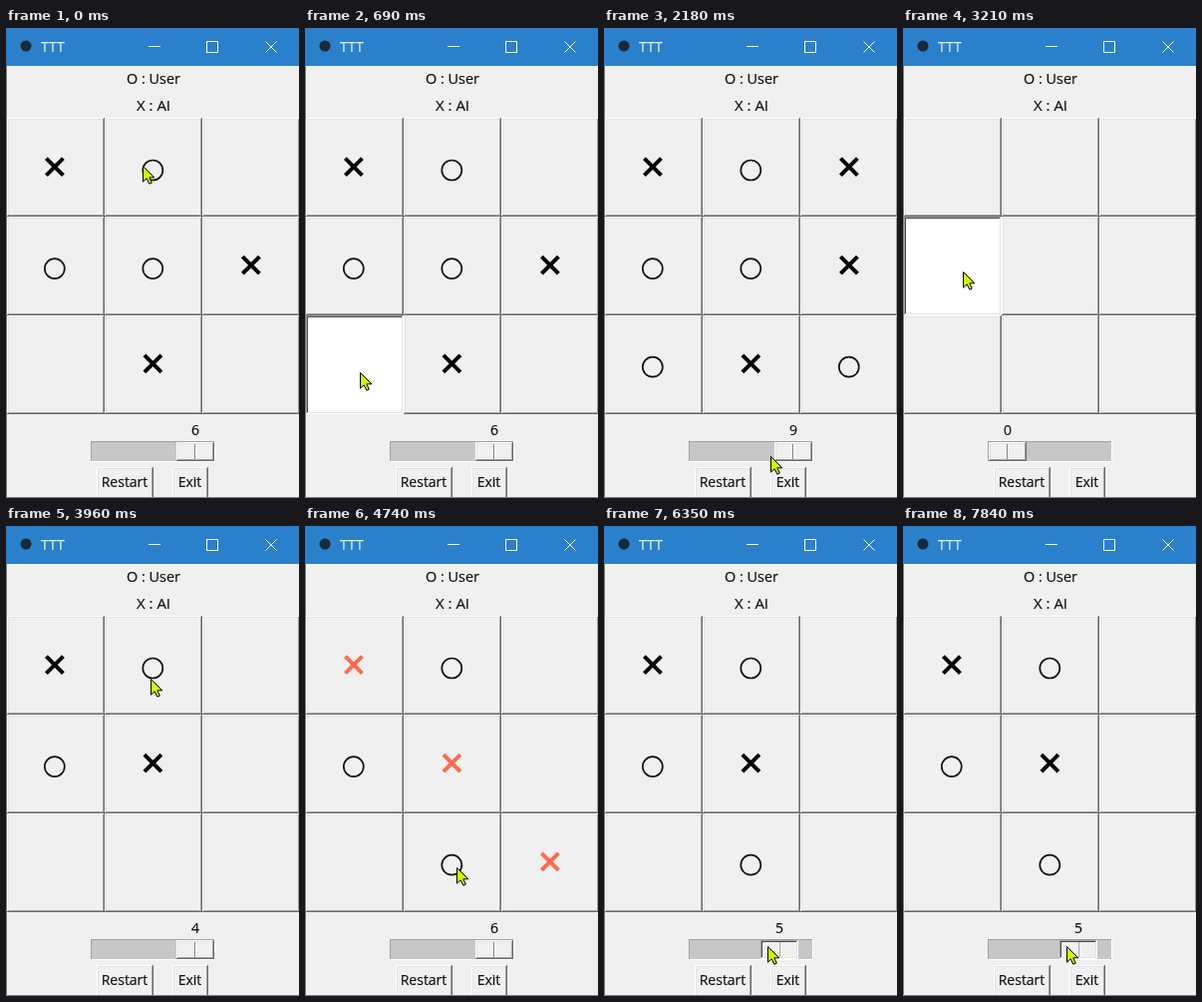
Recreate the animation shown at these times as an HTML page. Size 294x471 px, loop 8 s.

```html
<!DOCTYPE html>
<html lang="en">
<head>
<meta charset="utf-8">
<title>TTT</title>
<style>
  html, body { margin: 0; width: 100%; height: 100%; overflow: hidden; background: #f0f0f0; }
  svg { display: block; width: 294px; height: 471px; }
  text { font: 14px "Open Sans", "Noto Sans", sans-serif; fill: #111; stroke: #111; stroke-width: .2; text-anchor: middle; }
  .caption { fill: #e0f2ff; stroke: #e0f2ff; text-anchor: start; }
  .control { fill: none; stroke: #fff; }
  .o { fill: none; stroke: #111; stroke-width: 1.7; }
  .x { fill: none; stroke: #000; stroke-width: 4; }
  .won .x { stroke: #ff6a4a; }
  .cursor { fill: #c8ff00; stroke: #000; stroke-linejoin: round; }
</style>
</head>
<body>
<svg viewBox="0 0 294 471">
  <rect width="294" height="471" fill="#f0f0f0"/>
  <rect width="294" height="38" fill="#2a80cb"/>
  <circle cx="20" cy="18" r="5.5" fill="#1b2835"/>
  <text class="caption" x="35" y="24">TTT</text>
  <path class="control" d="M143 18.5h12M201.5 13.5h11v11h-11zM260.5 13.5l11 11m0-11l-11 11"/>
  <text x="148" y="56" style="font-size:14.4px">O : User</text>
  <text x="148" y="83" style="font-size:15px">X : AI</text>
  <g id="widgets"></g>
  <path d="M.5 38V470.5H294" fill="none" stroke="#808080"/>
  <path id="cursor" class="cursor" d="M.5.5V16.2L4.2 12.8L6.8 18.2L9.3 17.1L6.8 11.8H11.8Z"/>
</svg>
<script>
const LOOP = 8000, TICK = 135;

// The session is recorded once as pointer glides and widget states.
const glides = [{ start: 0, end: 0, x0: 137, y0: 138, x: 137, y: 138 }];
const states = [{ start: 0, board: "XO.OOX.X.", max: 6, pressed: null }];
let now = 0;

const put = (board, i, mark) => board.slice(0, i) + mark + board.slice(i + 1);
const count = board => board.replaceAll(".", "").length;

function glide(end, x, y) {
  const { x: x0, y: y0 } = glides.at(-1);
  glides.push({ start: now, end, x0, y0, x, y });
  now = end;
}

function set(change) {
  now += TICK;
  states.push({ ...states.at(-1), start: now, ...change });
}

function click(target, board) {
  set({ pressed: target });
  set({ pressed: null, board, max: count(board) });
}

function play(user, ai) {
  let board = put(states.at(-1).board, user, "O");
  if (ai !== undefined) board = put(board, ai, "X");
  click(user, board);
}

glide(540, 55, 345);
play(6, 2);
glide(1350, 205, 346);
glide(1500, 234, 344);
play(8);
glide(2180, 167, 429);
glide(2420, 122, 450);
click("restart", ".........");
glide(3070, 60, 244);
play(3, 0);
glide(3680, 145, 153);
play(1, 4);
glide(4350, 216, 318);
glide(4470, 152, 342);
play(7, 8);
glide(5270, 162, 405);
glide(5670, 178, 423);
set({ pressed: "thumb" });
now = 6080;
set({ board: put(states.at(-1).board, 8, ".") });
now = 5945;
glide(6350, 164, 421);
now = 7190 - TICK;
set({ pressed: null });
now = 7705 - TICK;
set({ pressed: "thumb" });

const at = (list, t) => list.findLast(item => item.start <= t);
const rect = (x, y, w, h, fill) =>
  `<rect x="${x}" y="${y}" width="${w}" height="${h}" fill="${fill}"/>`;

function bevel(x, y, w, h, down, fill = "#f0f0f0") {
  const [a, b, c, d] = down
    ? ["#a0a0a0", "#484848", "#fff", "#e3e3e3"]
    : ["#fff", "#e3e3e3", "#696969", "#a0a0a0"];
  return rect(x, y, w, h, c) + rect(x, y, w - 1, h - 1, a) +
    rect(x + 1, y + 1, w - 2, h - 2, d) + rect(x + 1, y + 1, w - 3, h - 3, b) +
    rect(x + 2, y + 2, w - 4, h - 4, fill);
}

function cell(mark, i, down) {
  const col = i % 3, row = Math.floor(i / 3);
  const cx = 48.8 + 98.5 * col, dy = 98.6 * row;
  let out = bevel(1 + 98 * col, 90 + 99 * row, 98, 99, down, down ? "#fff" : "#f0f0f0");
  if (mark == "O") out += `<circle class="o" cx="${cx}" cy="${142.5 + dy}" r="10"/>`;
  if (mark == "X") out += `<path class="x" d="M${cx - 8.4} ${130.6 + dy}l17 17m0-17l-17 17"/>`;
  return out;
}

function button(label, x, w, down) {
  const shift = down ? 1 : 0;
  return bevel(x, 440, w, 34, down) +
    `<text x="${x + w / 2 - .5 + shift}" y="${460 + shift}">${label}</text>`;
}

function slider(value, max, down) {
  const x = 86 + Math.round(85 * (max ? value / max : 0));
  return rect(85, 414, 125, 21, "#fff") + rect(85, 414, 124, 20, "#a0a0a0") +
    rect(86, 415, 123, 19, "#c7c7c7") +
    bevel(x, 415, 38, 19, down) +
    rect(x + 18, 417, 1, 15, down ? "#fff" : "#808080") +
    rect(x + 19, 417, 1, 15, down ? "#a0a0a0" : "#fff") +
    `<text x="${x + 19}" y="408">${value}</text>`;
}

function widgets({ board, max, pressed }) {
  const won = [0, 4, 8].every(i => board[i] == "X");
  const cells = [...board].map((mark, i) => cell(mark, i, pressed === i)).join("");
  return `<g class="${won ? "won" : ""}">${cells}</g>` +
    slider(count(board), max, pressed == "thumb") +
    button("Restart", 91, 57, pressed == "restart") + button("Exit", 167, 36, false);
}

// Pointer advances in whole ticks, easing in and out of each glide.
function pointer(t) {
  const { start, end, x0, y0, x, y } = at(glides, t);
  const ticks = Math.max(1, Math.round((end - start) / TICK));
  const p = t >= end ? 1 : Math.floor((t - start) / (end - start) * ticks) / ticks;
  const e = p * p * (3 - 2 * p);
  return [x0 + (x - x0) * e, y0 + (y - y0) * e].map(Math.round);
}

const panel = document.getElementById("widgets");
const cursor = document.getElementById("cursor");
let shown;

function frame() {
  const t = performance.now() % LOOP;
  const state = at(states, t);
  if (state !== shown) panel.innerHTML = widgets(shown = state);
  cursor.setAttribute("transform", `translate(${pointer(t)})`);
  requestAnimationFrame(frame);
}
frame();
</script>
</body>
</html>
```
